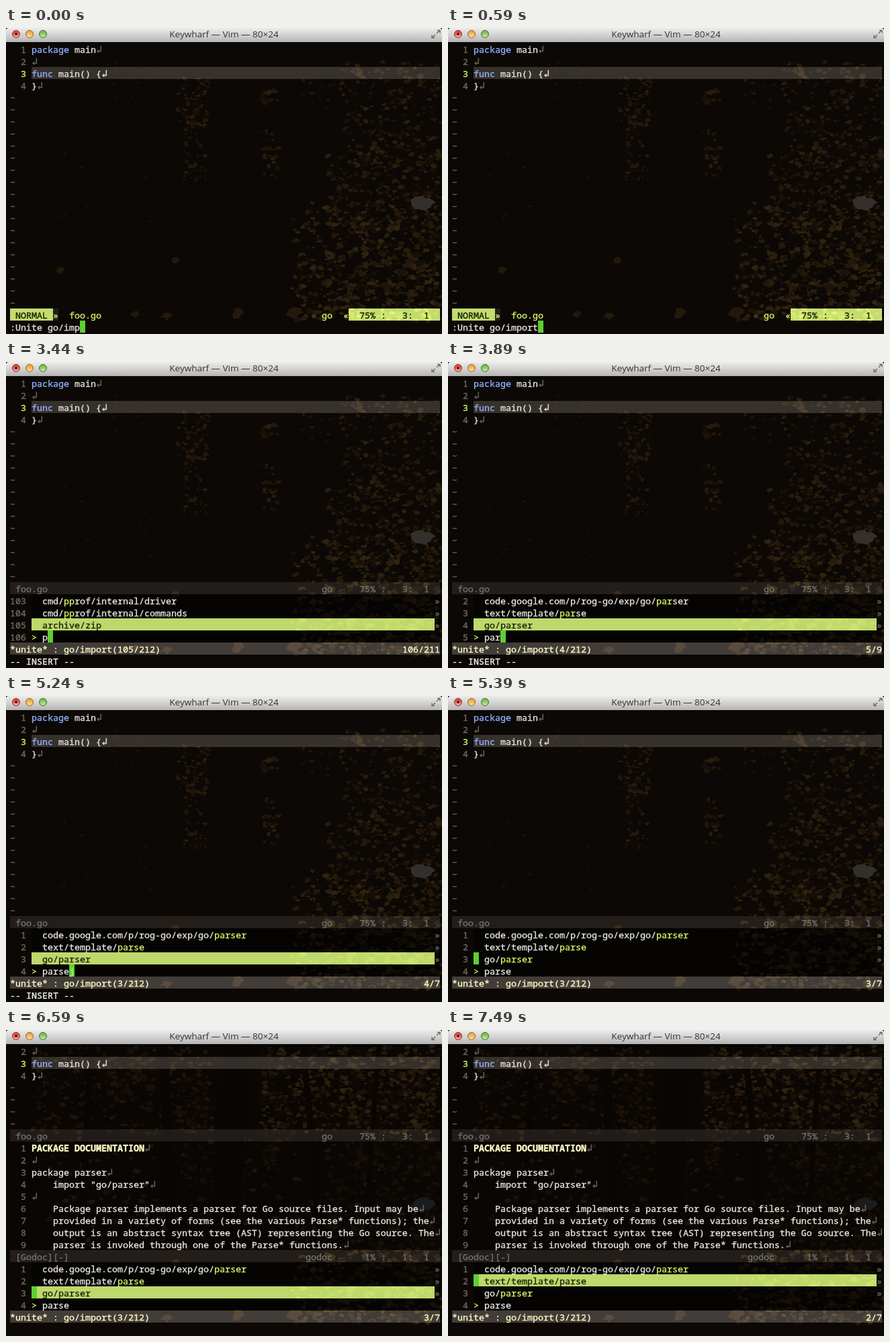
Recreate the animation shown at these times as an HTML page with a canvas. Size 649 by 456 pixels, loop 8000 ms.

```html
<!DOCTYPE html>
<html lang="en">
<head>
<meta charset="utf-8">
<title>Go import picker</title>
<style>
  html, body { margin: 0; width: 100%; height: 100%; overflow: hidden; background: #0c0805; }
  #stage { position: relative; width: 649px; height: 456px; overflow: hidden; isolation: isolate; background: #0c0805; }
  canvas { position: absolute; left: 0; top: 0; }
  #screen i, #screen b {
    position: absolute; height: 18px; line-height: 18px; white-space: pre; font-style: normal;
  }
  #screen i { mix-blend-mode: plus-lighter; }
  #screen i.shade { mix-blend-mode: normal; background: rgba(0, 0, 0, .5); }
  #screen i.lime { background: #b7d469; }
  #screen i.line { background: #2b2927; }
  #screen i.dim { background: #171615; }
  #screen i.grey { background: #363534; }
  #screen i.cursor { background: #5ecf34; mix-blend-mode: normal; }
  #screen b {
    margin-top: 1px; color: #e6e6e2; -webkit-text-stroke: .35px currentColor;
    font: 500 13.333px/18px "Noto Sans Mono", "DejaVu Sans Mono", monospace;
  }
  #screen b.num { color: #6c6a64; }
  #screen b.off { color: #73716e; }
  #screen b.key { color: #8fb0ff; }
  #screen b.hit { color: #d4f36c; }
  #screen b.hot { color: #d4f36c; }
  #screen b.strong { color: #f4f4ee; }
  #screen b.cream { color: #fdfbc4; }
  #screen b.head { color: #fdfbc4; font-weight: 700; }
  #screen b.ink { color: #1a2208; }
  #screen b.faint { color: #4a4844; }
  #screen b.ghost { color: #b4ee95; }
  #screen b.eol, #screen b.eolnow { font-family: "DejaVu Sans Mono", monospace; font-size: 15px; color: #65635e; }
  #screen b.eolnow { color: #dcdcd8; }
  #bar {
    position: absolute; left: 0; top: 0; width: 649px; height: 21px;
    background: linear-gradient(#ececec, #d2d2d2 50%, #b4b4b4);
    border-radius: 4px 4px 0 0; text-align: center; color: #333;
    font: 13.500px/19px "Open Sans", "Noto Sans", sans-serif;
  }
  #bar svg { position: absolute; left: 0; top: 0; }
</style>
</head>
<body>
<div id="stage">
  <canvas id="plain" width="649" height="456"></canvas>
  <canvas id="forest" width="649" height="456"></canvas>
  <div id="screen"></div>
  <div id="bar">Keywharf — Vim — 80×24
    <svg width="649" height="20">
      <defs>
        <radialGradient id="shine" cx=".5" cy=".95" r=".8">
          <stop offset="0" stop-color="#fff" stop-opacity=".65"/>
          <stop offset="1" stop-color="#fff" stop-opacity="0"/>
        </radialGradient>
      </defs>
      <g stroke-width="1">
        <circle cx="15" cy="9" r="5.5" fill="#e2463d" stroke="#8c3a35"/>
        <circle cx="35" cy="9" r="5.5" fill="#eba83c" stroke="#946a2c"/>
        <circle cx="55" cy="9" r="5.5" fill="#72bd4a" stroke="#47752f"/>
      </g>
      <g fill="url(#shine)">
        <circle cx="15" cy="9" r="5"/><circle cx="35" cy="9" r="5"/><circle cx="55" cy="9" r="5"/>
      </g>
      <circle cx="15" cy="9" r="2" fill="#5e1210"/>
      <path d="M641 8l4-4M642 3.500h4v4M639 10l-4 4M634 10.500v4h4" fill="none" stroke="#6e6e6e" stroke-width="1.5"/>
    </svg>
  </div>
</div>
<script>
const $ = id => document.getElementById(id);
const screen = $('screen');

// ---- wallpaper ----
function random(seed) {
  return () => {
    seed = seed + 0x6D2B79F5 | 0;
    let v = Math.imul(seed ^ seed >>> 15, 1 | seed);
    v = v + Math.imul(v ^ v >>> 7, 61 | v) ^ v;
    return ((v ^ v >>> 14) >>> 0) / 4294967296;
  };
}

const ground = '#0c0805';
const browns = ['#160e07', '#1d1309', '#24180b', '#291d0d', '#2e230f'];

function blob(g, rnd, x, y, size, colour) {
  g.fillStyle = colour;
  g.beginPath();
  for (let k = 0; k < 9; k++) {
    const a = k * Math.PI * 2 / 9, r = size * (.45 + rnd() * .75);
    g.lineTo(x + Math.cos(a) * r * 1.3, y + Math.sin(a) * r * .9);
  }
  g.fill();
}

// zone: left, top, width, height, count, size, brightest tone; a third of the blobs are dark gaps
function scatter(g, rnd, [x, y, w, h, count, size, tone], lean = 1) {
  for (let k = 0; k < count; k++) {
    const u = Math.pow(rnd(), 1 / lean), v = Math.pow(rnd(), 1 / lean);
    const shade = rnd() < .33 ? ground : browns[Math.floor(rnd() * (tone + 1))];
    blob(g, rnd, x + u * w, y + v * h, size * (.4 + rnd() * .8), shade);
  }
}

function paint(id, forest) {
  const g = $(id).getContext('2d'), rnd = random(11);
  g.fillStyle = ground;
  g.fillRect(0, 0, 649, 456);
  scatter(g, rnd, [150, 50, 90, 60, 30, 2.500, 0]);
  scatter(g, rnd, [256, 75, 46, 70, 110, 3.500, 3]);
  scatter(g, rnd, [264, 140, 34, 88, 80, 3, 3]);
  scatter(g, rnd, [380, 92, 26, 26, 16, 4, 3]);
  scatter(g, rnd, [380, 152, 26, 70, 50, 3, 3]);
  scatter(g, rnd, [440, 70, 70, 50, 24, 3.500, 2]);
  scatter(g, rnd, [500, 50, 148, 150, 300, 4, 3]);
  scatter(g, rnd, [480, 190, 168, 110, 420, 4, 3]);
  scatter(g, rnd, [425, 260, 223, 176, 1000, 4.500, 4], 1.3);
  scatter(g, rnd, [50, 150, 190, 170, 30, 2, 1]);
  for (const [x, y, r] of [[80, 361, 6], [192, 427, 6], [238, 429, 7], [345, 425, 9], [430, 424, 10], [253, 346, 5]])
    blob(g, rnd, x, y, r, browns[2]);
  if (forest) {
    g.fillStyle = 'rgba(9,5,3,.6)';
    g.fillRect(0, 20, 649, 308);
    scatter(g, rnd, [40, 24, 270, 130, 500, 4, 1]);
    scatter(g, rnd, [380, 24, 266, 130, 650, 4, 3]);
    scatter(g, rnd, [60, 160, 580, 168, 320, 4, 1]);
    scatter(g, rnd, [500, 30, 146, 110, 160, 4, 4]);
    g.strokeStyle = '#080503';
    for (const [x, lean, width] of [[120, 8, 10], [240, -6, 14], [335, 12, 40], [455, -14, 9], [545, 10, 7]]) {
      g.lineWidth = width;
      g.beginPath();
      g.moveTo(x + lean, 20);
      g.quadraticCurveTo(x, 140, x - lean, 326);
      g.stroke();
    }
  }
  for (const x of [618, 622, 626])
    blob(g, rnd, x, 260, 12, forest ? '#1b1c1e' : '#332f2c');
}
paint('plain', false);
paint('forest', true);

// ---- text grid: 8 by 18 px cells ----
function cell(tag, row, col, cls) {
  const el = document.createElement(tag);
  el.className = cls;
  el.style.left = 6 + col * 8 + 'px';
  el.style.top = 22 + row * 18 + 'px';
  screen.append(el);
  return el;
}
const text = (row, col, str, cls = '') => { cell('b', row, col, cls).textContent = str; };
const fill = (row, col, len, cls) => { cell('i', row, col, cls).style.width = len * 8 + 'px'; };
const eol = (row, col, now) => text(row, col, '↲', now ? 'eolnow' : 'eol');
const number = (row, n, cls = 'num') => text(row, 0, String(n).padStart(3), cls);

// lights the word and any of its letters that follow on directly
function marked(row, col, str, word) {
  for (const part of str.split(new RegExp(`(${word}[${word}]*)`))) {
    if (part) text(row, col, part, part.startsWith(word) ? 'hit' : '');
    col += part.length;
  }
}

function source(first, tildeEnd) {
  const row = n => n - first;
  if (first === 1) {
    number(0, 1);
    text(0, 4, 'package', 'key');
    text(0, 12, 'main');
    eol(0, 16);
  }
  number(row(2), 2);
  eol(row(2), 4);
  fill(row(3), 4, 76, 'line');
  number(row(3), 3, 'hot');
  text(row(3), 4, 'func', 'key');
  text(row(3), 9, 'main() {');
  eol(row(3), 17, true);
  number(row(4), 4);
  text(row(4), 4, '}');
  eol(row(4), 5);
  for (let r = row(5); r < tildeEnd; r++) text(r, 0, '~', 'num');
}

function idleStatus(row, name, type, percent, line) {
  fill(row, 0, 80, 'dim');
  text(row, 1, name, 'off');
  text(row, 60 - type.length, type, 'off');
  text(row, 65, `${percent.padStart(3)} :   ${line}:  1`, 'off');
}

function command(typed) {
  source(1, 22);
  fill(22, 0, 8, 'lime');
  fill(22, 8, 1, 'dim');
  fill(22, 63, 17, 'lime');
  text(22, 1, 'NORMAL', 'ink');
  text(22, 8, '»', 'hot');
  text(22, 11, 'foo.go', 'hit');
  text(22, 56, '«', 'faint');
  text(22, 58, 'go', 'hot');
  text(22, 62, '«', 'hot');
  text(22, 65, '75% :   3:  1', 'ink');
  text(23, 0, typed);
  fill(23, typed.length, 1, 'cursor');
}

// items run top to bottom; sel is the lit row, cur the normal-mode cursor row
function picker({ items, count, query = '', sel = 2, at = 0, insert = true, cur = -1, ghost = '' }) {
  for (let r = 18; r < 22; r++) fill(r, 4, 76, 'shade');
  items.forEach((item, k) => {
    const row = 18 + k;
    number(row, count - 2 + k);
    if (k === sel) {
      fill(row, 4, 75, 'lime');
      text(row, 6, item, 'ink');
    } else if (query) marked(row, 6, item, query);
    else text(row, 6, item);
    text(row, 79, '»', 'num');
    if (k === cur) fill(row, 4, 1, 'cursor');
  });
  number(21, count + 1);
  text(21, 4, '>', 'hot');
  text(21, 6, query);
  if (insert) {
    fill(21, 6 + query.length, 1, 'cursor');
    text(21, 6 + query.length, ghost, 'ghost');
    text(23, 0, '-- INSERT --', 'strong');
  }
  const place = `${at || count + 1}/${count * 2 + 1}`;
  fill(22, 0, 80, 'grey');
  text(22, 0, `*unite* : go/import(${query ? count + '/' : ''}212)`, 'cream');
  text(22, 80 - place.length, place, 'cream');
}

function pick(options) {
  source(1, 17);
  idleStatus(17, 'foo.go', 'go', '75%', 3);
  picker(options);
}

const doc = [
  'PACKAGE DOCUMENTATION', '', 'package parser', '    import "go/parser"', '',
  '    Package parser implements a parser for Go source files. Input may be',
  '    provided in a variety of forms (see the various Parse* functions); the',
  '    output is an abstract syntax tree (AST) representing the Go source. The',
  '    parser is invoked through one of the Parse* functions.'
];

function preview(options) {
  source(2, 7);
  idleStatus(7, 'foo.go', 'go', '75%', 3);
  doc.forEach((str, k) => {
    number(8 + k, k + 1);
    text(8 + k, 4, str, k ? '' : 'head');
    eol(8 + k, 4 + str.length);
  });
  idleStatus(17, '[Godoc][-]', 'godoc', '1%', 1);
  picker(options);
}

// ---- timeline ----
const all = ['bufio', 'archive/zip', 'archive/tar'];
const some = ['cmd/pprof/internal/driver', 'cmd/pprof/internal/commands', 'archive/zip'];
const paths = ['path/filepath', 'path', 'go/parser'];
const parsers = ['code.google.com/p/rog-go/exp/go/parser', 'text/template/parse', 'go/parser'];
const found = { items: parsers, count: 3, query: 'parse' };
const browse = { ...found, insert: false, at: 3, sel: -1 };

const steps = [
  [0, command, ':Unite go/imp'],
  [140, command, ':Unite go/impo'],
  [290, command, ':Unite go/impor'],
  [590, command, ':Unite go/import'],
  [1790, pick, { items: all, count: 212 }],
  [3440, pick, { items: some, count: 105, query: 'p' }],
  [3590, pick, { items: paths, count: 8, query: 'pa' }],
  [3890, pick, { items: parsers, count: 4, query: 'par' }],
  [4190, pick, { ...found, query: 'pars' }],
  [4640, pick, found],
  [5240, pick, { ...found, ghost: 'j' }],
  [5390, pick, { ...browse, cur: 2 }],
  [6440, pick, browse],
  [6590, preview, { ...browse, sel: 2, cur: 2 }],
  [7490, preview, { ...browse, sel: 1, cur: 1, at: 2 }]
];

let shown = -1;
function tick(now) {
  const t = now % 8000;
  const index = steps.findLastIndex(step => step[0] <= t);
  if (index !== shown) {
    shown = index;
    const [, draw, value] = steps[index];
    screen.replaceChildren();
    $('forest').style.visibility = draw === preview ? 'visible' : 'hidden';
    draw(value);
  }
  requestAnimationFrame(tick);
}
tick(performance.now());
</script>
</body>
</html>
```
